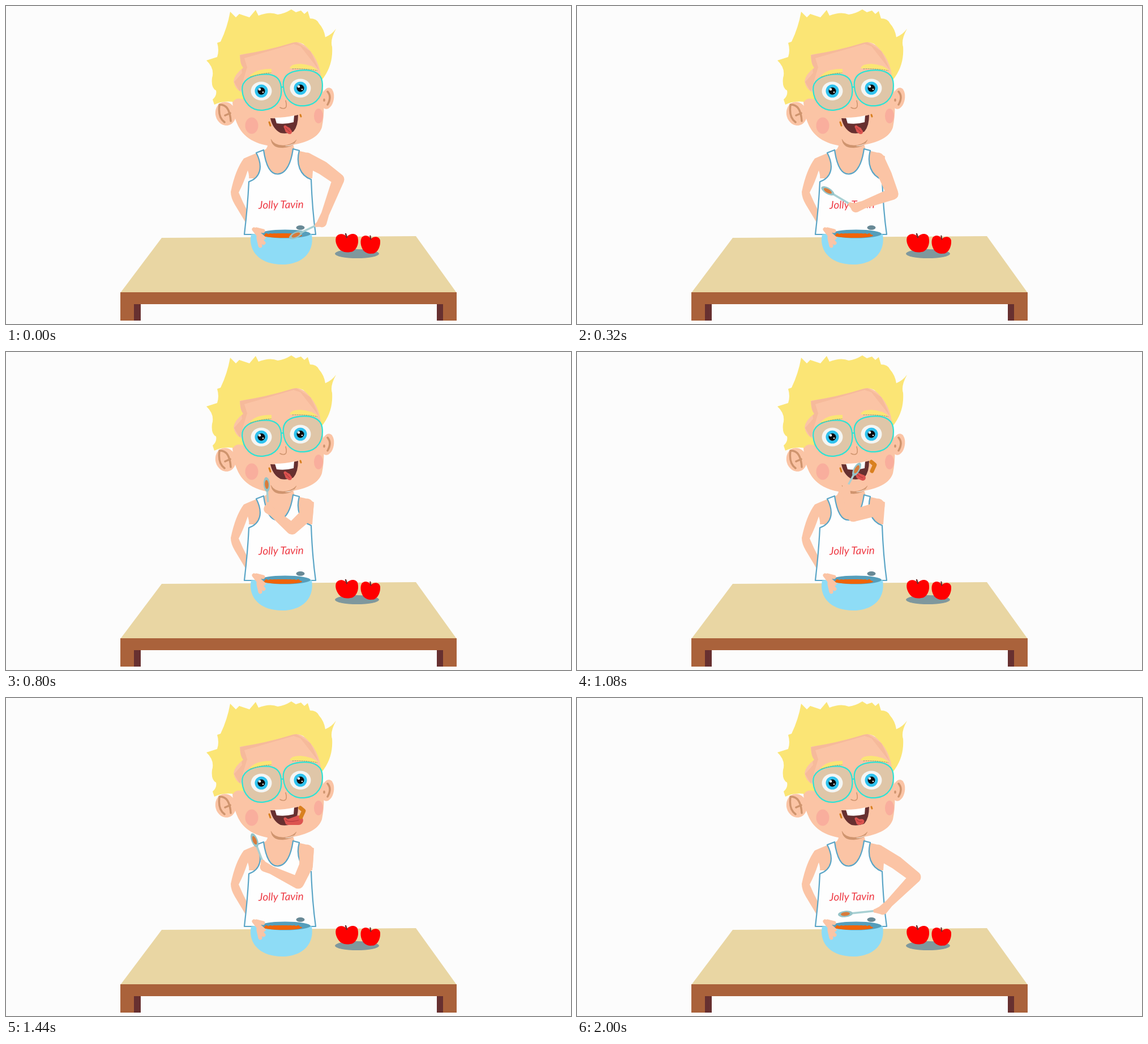
Write an HTML page that moves like this. It is 998 px wide and 561 px high and loops after 2040 ms.

```html
<!DOCTYPE html>
<html lang="en">
<head>
<meta charset="utf-8">
<title>Boy eating</title>
<style>
html, body { margin: 0; width: 100%; height: 100%; overflow: hidden; background: #fcfcfc; }
svg { display: block; width: 100vw; height: 100vh; }
.skin { fill: #fbc4a5; }
.hair { fill: #fbe575; }
.wood { fill: #aa623b; }
.dark { fill: #673030; }
.line { fill: none; stroke-linecap: round; stroke-linejoin: round; }
.teal { stroke: #2ce3d5; stroke-width: 2.2; }
.brown { stroke: #cf946e; }
.food { stroke: #d9801f; }
text { font: italic 19px Lato, "Open Sans", cursive; fill: #ee3b45; text-anchor: middle; }
</style>
</head>
<body>
<svg viewBox="0 0 998 561">
  <defs>
    <path id="lens" class="teal" fill="#dfc6a8" d="M-35 -8C-34 -24 -18 -31 2 -31S34 -24 34 -6C35 18 20 32 -1 32S-36 16 -35 -8Z"/>
    <g id="eye">
      <ellipse rx="18.5" ry="16.5" fill="#f4f6f4"/>
      <circle r="11.5" fill="#30c2ee"/>
      <circle r="6.5" fill="#0b0b0d"/>
      <circle cx="-3" cy="-3" r="2.3" fill="#fff"/>
      <circle cx="3" cy="2" r="1.2" fill="#fff"/>
    </g>
    <g id="apple">
      <path fill="red" d="M0 -11C7 -18 16 -17 19 -11C23 3 15 16 6 16Q-3 18 -11 13C-19 6 -22 -6 -18 -12C-12 -18 -5 -16 0 -11Z"/>
      <path class="line" stroke="#673030" stroke-width="2.5" d="M0 -10L-2 -16"/>
    </g>
  </defs>

  <!-- table -->
  <path fill="#e9d6a3" d="M275 409L724 406L796 506H202Z"/>
  <path class="wood" d="M202 505H796V555H772V526H226V555H202Z"/>
  <path class="dark" d="M226 526h12v29h-12zM761 526h11v29h-11z"/>

  <!-- body -->
  <path class="skin" d="M462 240H506L510 254L528 258L544 265L541 304H429Q430 299 427 290Q420 312 411 329Q424 360 443 391L434 401Q420 376 404 350Q397 338 397 328Q405 289 420 269Q438 261 452 256Q464 253 462 240Z"/>
  <path fill="#fefefe" stroke="#5aa5c6" stroke-width="2.2" stroke-linejoin="round" d="M442 259L455 254C458 275 464 297 480 296.5S504 274 507 252L518 255C512 278 519 299 539 306Q541 360 547 403H421Q427 352 429 310C449 303 455 284 442 259Z"/>
  <text x="486" y="357" transform="rotate(-1 486 357)">Jolly Tavin</text>

  <!-- face, hair and ears -->
  <path class="skin" d="M402 120C398 160 399 185 408 207C418 232 442 246 478 248C520 246 551 236 558 214C564 185 562 150 555 112Q545 72 512 62L412 86Z"/>
  <path fill="#f6ba9b" d="M403 134L417 118L413 87L470 73L512 63L538 80L553 113L520 71L508 67L421 92L426 108L413 151Z"/>
  <path class="hair" d="M365 165Q373 158 371 149Q362 145 364 127Q369 110 354 96L373 90Q377 78 373 65L379 63Q391 38 396 10L406 20L412 14L430 20L441 7L446 17Q466 9 480 15Q491 14 504 6L512 11L521 8L527 14L533 9L537 22Q549 22 553 31Q562 41 564 55Q576 50 583 40Q572 60 576 72Q578 102 562 125L557 132Q555 91 525 67Q514 61 502 66Q460 79 413 86Q413 102 419 109Q403 121 402 133Q405 148 416 152L420 165Q407 160 401 169Q384 167 368 174Z"/>
  <g class="skin">
    <ellipse cx="388" cy="190" rx="18" ry="21" transform="rotate(-15 388 190)"/>
    <ellipse cx="568" cy="163" rx="11" ry="19" transform="rotate(10 568 163)"/>
  </g>
  <path class="line brown" stroke-width="3.5" d="M377 174Q395 173 397 203M377 175Q374 196 386 205M387 193L396 189M568 151Q576 160 568 174M562 165v2"/>
  <g fill="#f9ae9d">
    <ellipse cx="434" cy="211" rx="11.5" ry="14.5"/>
    <ellipse cx="552" cy="194" rx="8" ry="13"/>
  </g>

  <!-- glasses and eyes -->
  <g transform="rotate(-6 488 143)">
    <use href="#lens" x="452" y="148"/>
    <use href="#lens" transform="translate(524 148) scale(-1 1)"/>
    <path class="teal" d="M486 143h4"/>
  </g>
  <use href="#eye" x="451" y="150"/>
  <use href="#eye" x="520" y="145"/>
  <path class="hair" d="M429 125Q441 110 469 111V118Q448 119 429 125ZM501 110Q503 102 520 102Q540 103 552 114Q526 110 501 110Z"/>
  <path class="line" stroke="#8d9c70" stroke-dasharray="2 2" d="M432 125Q448 119 468 118M506 111Q530 110 550 114"/>
  <path class="line brown" stroke-width="1.6" d="M494 167Q497 178 493 180Q489 182 484 179"/>

  <!-- mouth -->
  <path class="dark" d="M467 198Q492 199 516 192Q516 213 507 222Q496 226 485 224Q471 217 467 198Z"/>
  <path fill="#fff" d="M475 197Q494 197 509 193L508 205Q494 209 478 207Z"/>
  <path id="tongue" fill="#dc5450"/>
  <path id="crease" class="line" stroke="#b53b40" stroke-width="1.2"/>
  <path class="line food" stroke-width="3" d="M465 205L467 211M520 192L521 195"/>
  <path id="stain" class="line food" stroke-width="7" d="M520 194L526 199L521 210"/>
  <path class="brown" fill="#cf946e" stroke-width=".5" d="M468 235Q474 246 489 246T513 236Q508 249 489 250T468 235Z"/>
  <path fill="#fff" d="M492 247Q503 246 509 242Q504 248 492 247Z"/>

  <!-- bowl -->
  <ellipse cx="520" cy="391" rx="7.5" ry="4" fill="#688996"/>
  <path fill="#8edcf6" d="M433 403Q486 393 540 403C545 433 525 456 487 456S427 433 433 403Z"/>
  <ellipse cx="493" cy="402" rx="45" ry="7.5" fill="#559ebb"/>
  <ellipse cx="489" cy="405" rx="34" ry="4" fill="#f06408"/>
  <path class="line" stroke="#f06408" stroke-width="6" stroke-dasharray="0 7" d="M460 404H522"/>
  <path class="line" stroke="#fbc4a5" stroke-width="7" d="M438 394L445 403L450 413M442 394L454 397M445 400L455 409M446 408L455 418M446 410L449 423"/>

  <!-- apples -->
  <ellipse cx="620" cy="437" rx="39" ry="8" fill="#7f989d"/>
  <use href="#apple" x="602" y="418"/>
  <use href="#apple" transform="translate(643 421) rotate(8) scale(.87 .95)"/>

  <!-- spoon and moving arm -->
  <path id="handle" class="line" stroke="#a8d0d3" stroke-width="3.5"/>
  <g id="scoop">
    <ellipse rx="13" ry="5.6" fill="#96c3c7"/>
    <ellipse rx="8" ry="3.3" fill="#d87b3b"/>
  </g>
  <path id="arm" class="skin"/>
</svg>
<script>
const LOOP = 2040, STEP = 40;
const $ = id => document.getElementById(id);
const mix = (a, b, k) => a + (b - a) * k;
const mixPoint = (p, q, k) => [mix(p[0], q[0], k), mix(p[1], q[1], k)];
const clamp = k => Math.min(1, Math.max(0, k));

// Each pose: elbow, hand, spoon
const shoulder = [531, 271];
const scoop = [[587, 306], [558, 382], [512, 404]];
const chest = [[553, 335], [483, 352], [433, 315]];
const chin = [[516, 326], [457, 298], [439, 251]];
const mouth = [[488, 289], [474, 244], [494, 207]];
const lift = [[597, 316], [540, 374], [474, 381]];
const moves = [
  [40, scoop], [360, chest], [620, chin], [1080, mouth],
  [1440, chin], [1720, chest], [2000, lift]
];

function pose(t) {
  const i = Math.max(1, moves.findIndex(([end]) => end >= t));
  const [t0, from] = moves[i - 1], [t1, to] = moves[i];
  const k = clamp((t - t0) / (t1 - t0));
  return from.map((p, j) => mixPoint(p, to[j], k));
}

// Tapered tube through circles [x, y, radius]
function tube(joints) {
  return joints.map(([x, y, r], i) => {
    let d = `M${x - r} ${y}a${r} ${r} 0 1 0 ${2 * r} 0a${r} ${r} 0 1 0 ${-2 * r} 0Z`;
    if (i) {
      const [px, py, pr] = joints[i - 1];
      const len = Math.hypot(x - px, y - py) || 1;
      const nx = (py - y) / len, ny = (x - px) / len;
      d += `M${px + nx * pr} ${py + ny * pr}L${x + nx * r} ${y + ny * r}` +
        `L${x - nx * r} ${y - ny * r}L${px - nx * pr} ${py - ny * pr}Z`;
    }
    return d;
  }).join('');
}

function drawArm(t) {
  const [elbow, hand, spoon] = pose(t);
  const [mx, my] = mixPoint(shoulder, elbow, .5);
  $('arm').setAttribute('d', tube([
    [...shoulder, 12.5], [Math.max(530, mx), my - 3, 12], [...elbow, 10.5],
    [...mixPoint(elbow, hand, .8), 7], [...hand, 8.5],
    [...mixPoint(hand, spoon, .2), 3.5]
  ]));
  $('handle').setAttribute('d', `M${hand}L${spoon}`);
  const angle = Math.atan2(spoon[1] - hand[1], spoon[0] - hand[0]) * 180 / Math.PI;
  $('scoop').setAttribute('transform', `translate(${spoon}) rotate(${angle})`);
}

// The tongue reaches out, sweeps up over the stain and returns
function drawTongue(t) {
  const p = clamp((t - 1000) / (LOOP - 1000));
  const reach = Math.sin(Math.PI * p);
  const x = 501 + 16 * reach, y = 222 - 36 * reach * p * p;
  $('tongue').setAttribute('d', tube([[493, 213, 2.5], [498, 219, 5], [x, y, 4 + 4.5 * reach]]));
  $('crease').setAttribute('d', `M494 215Q499 220 ${x} ${y}`);
  $('stain').style.display = t >= 960 && t < 1600 ? '' : 'none';
}

const start = performance.now();
function tick() {
  const t = Math.floor((performance.now() - start) % LOOP / STEP) * STEP;
  drawArm(t);
  drawTongue(t);
  requestAnimationFrame(tick);
}
tick();
</script>
</body>
</html>
```
